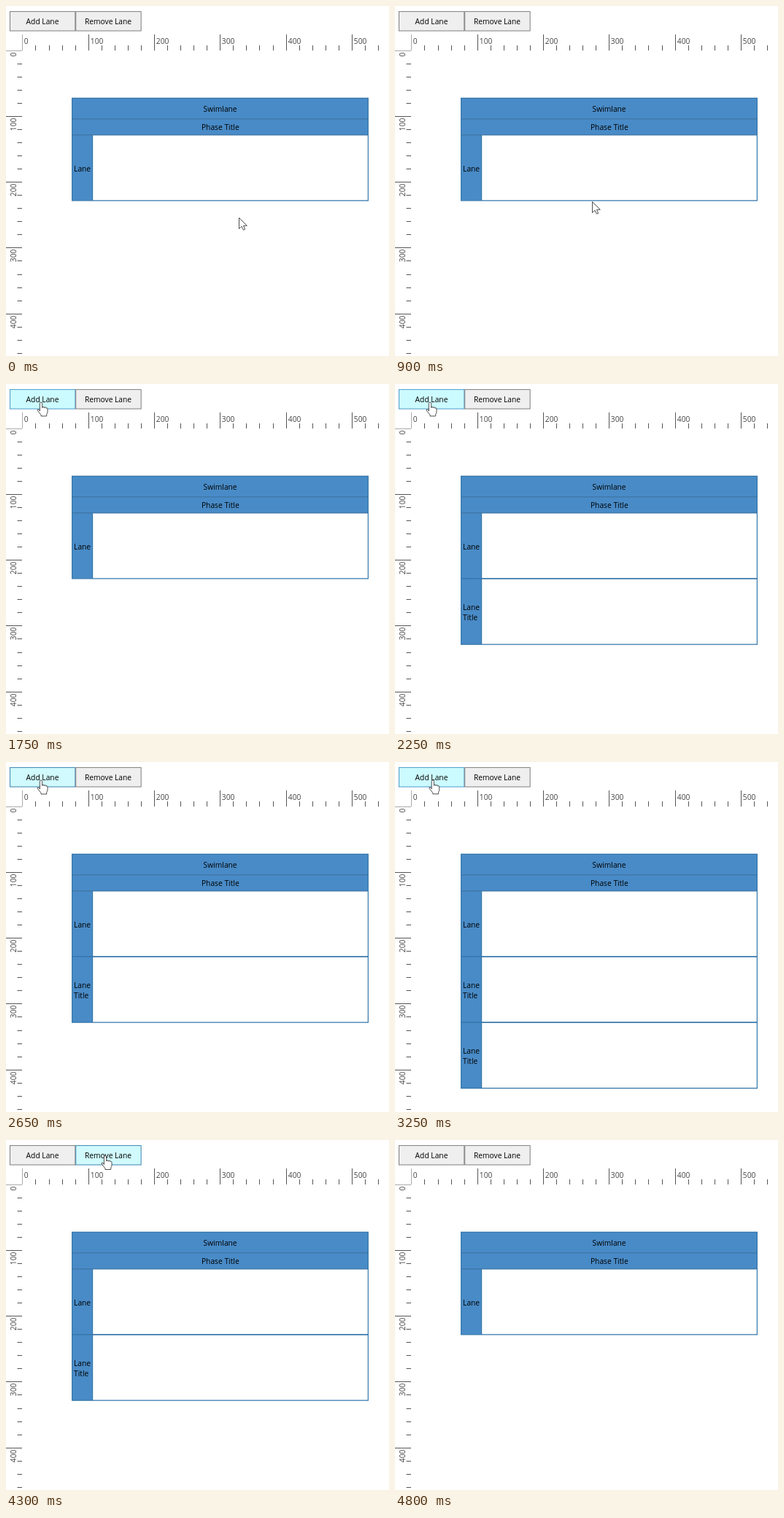
Write an HTML page that moves like this. It is 525 px wide and 480 px high and loops after 5.45 s.

```html
<!DOCTYPE html>
<html lang="en">
<head>
<meta charset="utf-8">
<title>Swimlane editor</title>
<style>
  html, body { margin: 0; width: 100%; height: 100%; overflow: hidden; background: #fff; }
  svg { display: block; width: 525px; height: 480px; font: 10.25px "Open Sans", "Noto Sans", sans-serif; }
  .mid { text-anchor: middle; }
  .tick { stroke: #555; }
  .origin { stroke: #aaa; }
  .num { fill: #444; }
  .btn rect { fill: #efefef; stroke: #707070; stroke-width: .9; }
  .btn.hover rect { fill: #ccfbff; stroke: #3c8fc4; }
  .btn.press rect { fill: #d0fafd; stroke: #2c77a8; }
  .blue { fill: #498bc7; }
  .edge { fill: none; stroke: #3577aa; stroke-width: 1.2; }
  .rule { stroke: #4079a9; stroke-width: 1.6; }
  .tip rect { fill: #fff; stroke: #8a8a8a; }
  .tip text { fill: #606060; }
  #cursor path { fill: #fff; stroke: #222; stroke-width: .8; stroke-linejoin: round; }
</style>
</head>
<body>
<svg viewBox="0 0 525 480">
  <g id="ruler"></g>
  <g class="btn" id="add">
    <rect x="5.45" y="7.65" width="89.4" height="26.4"/><text class="mid" x="50" y="24.5">Add Lane</text>
  </g>
  <g class="btn" id="remove">
    <rect x="95.75" y="7.65" width="89.4" height="26.4"/><text class="mid" x="140" y="24.5">Remove Lane</text>
  </g>
  <g id="lanes"></g>
  <rect class="blue" x="90.6" y="126.3" width="405.8" height="50.2"/>
  <path class="rule" d="M90.6 154.8H496.4M90.6 176.7H496.4"/>
  <path class="edge" d="M90.6 176.5V126.3H496.4V176.5"/>
  <text class="mid" x="293.6" y="145">Swimlane</text>
  <text class="mid" x="293.8" y="170.3">Phase Title</text>
  <g class="tip" id="tip">
    <rect x="64.5" y="41.5" width="76" height="23"/><text class="mid" x="102.5" y="57.8">Remove Lane</text>
  </g>
  <g id="cursor">
    <path id="arrow" d="M0 0V15L3.5 11.7 6 16.7 8.2 15.7 6 10.8H10.8Z"/>
    <path id="hand" d="M-1.6 12V1.6a1.6 1.6 0 0 1 3.2 0V7.5a1.3 1.3 0 0 1 2.7.3 1.3 1.3 0 0 1 2.6.5 1.2 1.2 0 0 1 2.1.7V13q0 2-1.3 3.5V19H0V17.5L-4.6 11.5q-.8-2 1-2Z"/>
  </g>
</svg>
<script>
const $ = id => document.getElementById(id);
const LOOP = 5450, STEP = 50, ZOOM = .903;

// Rulers: a long labelled tick every fifth step of 20 units
function ruler() {
  let marks = '';
  for (let i = 0; i < 28; i++) {
    const major = i % 5 === 0, kind = i ? 'tick' : 'origin';
    const offset = i * 20 * ZOOM;
    const x = Math.round(22.4 + offset), y = Math.round(60.5 + offset);
    marks += `<path class="${kind}" d="M${x + .5} ${major ? 39 : 54}V61M${major ? 0 : 15.5} ${y + .5}H22"/>`;
    if (major) marks += `<text class="num" x="${x + 2.8}" y="51.6">${i * 20}</text>
      <text class="num" text-anchor="end" transform="translate(13.5 ${y + 2.6}) rotate(-90)">${i * 20}</text>`;
  }
  return marks;
}

function lane(i) {
  const height = 100 * ZOOM, y = 176.5 + height * i;
  const label = i
    ? `<text x="93" y="${y + 42.8}">Lane<tspan x="93" dy="14.4">Title</tspan></text>`
    : `<text class="mid" x="104.6" y="${y + 50}">Lane</text>`;
  return `<g><rect class="blue" x="90.6" y="${y}" width="28" height="${height}"/>
    <path class="edge" d="M90.6 ${y}H496.4v${height}H90.6ZM118.6 ${y}v${height}"/>${label}</g>`;
}

$('ruler').innerHTML = ruler();
$('lanes').innerHTML = [0, 1, 2].map(lane).join('');

// The pointer rests at each stop, then glides to the next one
const start = { x: 319.5, y: 290.5 };
const stops = [
  { from: 650, to: 900, x: 270.5, y: 268.5 },
  { from: 950, to: 1200, x: 113.5, y: 114.5 },
  { from: 1200, to: 1750, x: 48, y: 25 },
  { from: 3200, to: 3600, x: 136, y: 21.5 },
  { from: 4550, to: 4750, x: 331, y: 416 }
];
const clicks = [
  { down: 2100, up: 2200, change: 1 },
  { down: 2650, up: 2800, change: 1 },
  { down: 3900, up: 4000, change: -1 },
  { down: 4300, up: 4400, change: -1 }
];

const ease = p => p * p * (3 - 2 * p);

function pointer(t) {
  let { x, y } = start;
  for (const s of stops) {
    const p = ease(Math.min(1, Math.max(0, (t - s.from) / (s.to - s.from))));
    x += (s.x - x) * p;
    y += (s.y - y) * p;
  }
  return { x, y };
}

function show(el, on) { el.style.display = on ? '' : 'none'; }

function draw(now) {
  const t = Math.floor(now % LOOP / STEP) * STEP;
  const { x, y } = pointer(t);
  const visible = t < 4800;
  const over = visible && y > 7 && y < 35 && x > 5 && x < 186;
  const pressed = clicks.some(c => t >= c.down && t < c.up);
  const count = clicks.reduce((n, c) => n + (t >= c.up ? c.change : 0), 1);
  const look = on => 'btn' + (over && on ? pressed ? ' press' : ' hover' : '');
  $('add').setAttribute('class', look(x < 95));
  $('remove').setAttribute('class', look(x >= 95));
  [...$('lanes').children].forEach((el, i) => show(el, i < count));
  show($('tip'), t >= 3800 && t < 3900);
  show($('cursor'), visible);
  show($('hand'), over);
  show($('arrow'), !over);
  $('cursor').setAttribute('transform', `translate(${x} ${y})`);
  requestAnimationFrame(draw);
}
requestAnimationFrame(draw);
</script>
</body>
</html>
```
